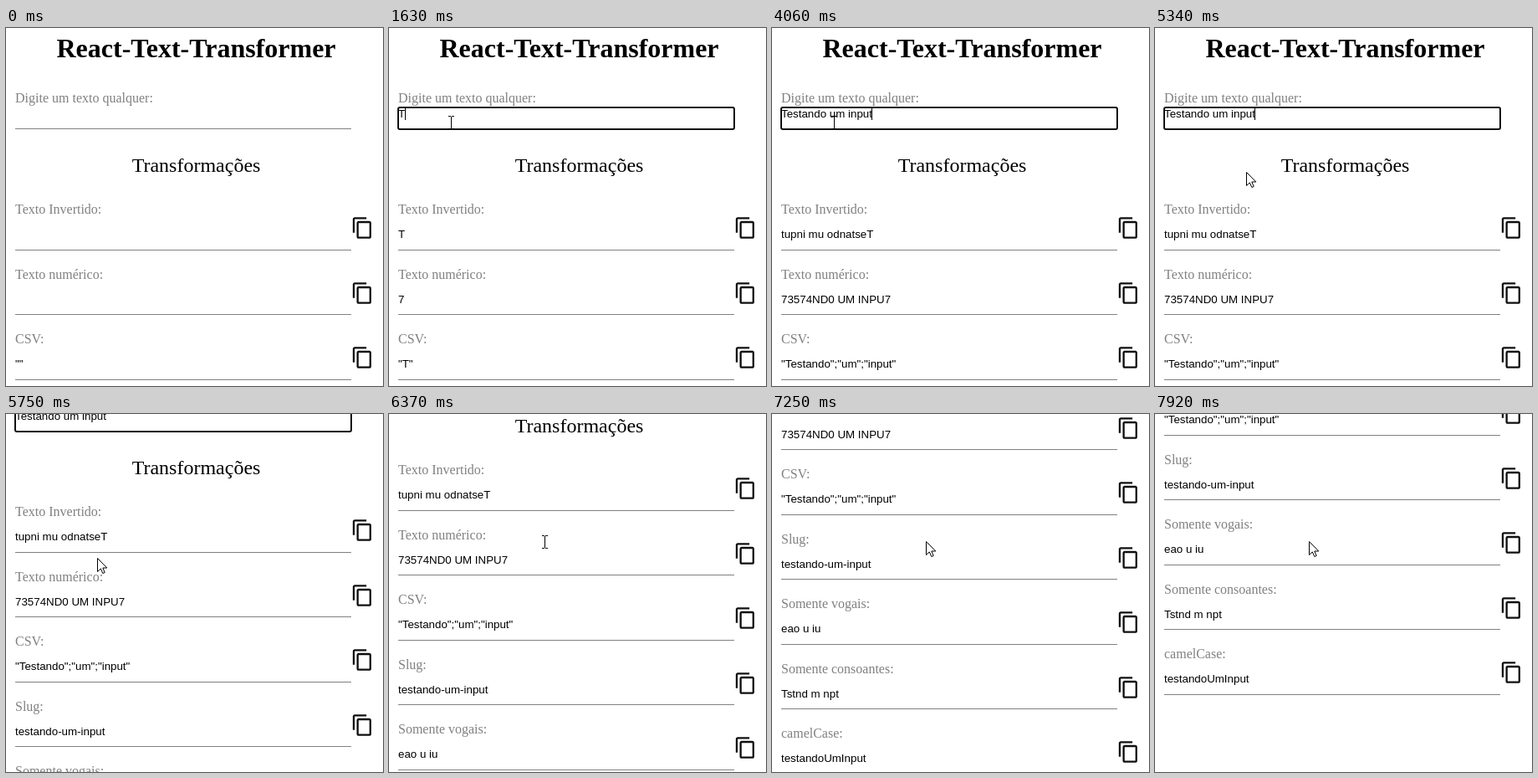
Recreate the animation shown at these times as an HTML page with a canvas. Size 451 by 428 pixels, loop 7990 ms.

```html
<!DOCTYPE html>
<html lang="pt-BR">
<head>
<meta charset="utf-8">
<title>React-Text-Transformer</title>
<style>
  html, body { margin: 0; width: 100%; height: 100%; overflow: hidden; background: #fff; }
  canvas { display: block; }
</style>
</head>
<body>
<canvas id="stage" width="451" height="428"></canvas>
<script>
const ctx = document.getElementById('stage').getContext('2d');
const LOOP = 7990, STEP = 70, W = 451, H = 428;
const LEFT = 11, RIGHT = 413, CENTER = 227.5;
const SERIF = '"Liberation Serif", "Times New Roman", serif';
const SANS = '13.333px "Liberation Sans", Arial, sans-serif';
const GRAY = '#808080', INK = '#101010';

const PHRASE = 'Testando um input';
const FOCUS_AT = 900;
// bursts of typing: first key, last key, number of keys
const BURSTS = [[1630, 1760, 2], [1960, 2680, 7], [3010, 3270, 3], [3470, 3730, 3], [3930, 4060, 2]];
const KEYS = BURSTS.flatMap(([a, b, n]) =>
  Array.from({ length: n }, (_, i) => a + (b - a) * i / (n - 1)));

// first visible step, time already elapsed by then, duration, target
const SCROLLS = [[5540, 30, 200, 100], [6300, 40, 220, 200], [7040, 19, 220, 300], [7780, 40, 180, 395]];
const MOVES = [[70, 0, 490, 72, 112], [4920, 70, 490, 109, 172], [5810, 0, 490, 184, 152]];

const LEET = { T: 7, E: 3, S: 5, A: 4, O: 0 };
const words = s => s.trim().toLowerCase().split(' ');
const ROWS = [
  ['Texto Invertido:', s => [...s].reverse().join('')],
  ['Texto numérico:', s => s.toUpperCase().replace(/[TESAO]/g, c => LEET[c])],
  ['CSV:', s => s.split(' ').map(w => `"${w}"`).join(';')],
  ['Slug:', s => words(s).join('-')],
  ['Somente vogais:', s => s.replace(/[^aeiou ]/gi, '')],
  ['Somente consoantes:', s => s.replace(/[aeiou]/gi, '')],
  ['camelCase:', s => words(s).map((w, i) => i ? w.charAt(0).toUpperCase() + w.slice(1) : w).join('')]
];
const rowY = (base, i) => Math.floor(base + 77.5 * i);

const COPY = new Path2D('M16 1H4c-1.1 0-2 .9-2 2v14h2V3h12V1zm3 4H8c-1.1 0-2 .9-2 2v14c0 1.1.9 2 2 2h11c1.1 0 2-.9 2-2V7c0-1.1-.9-2-2-2zm0 16H8V7h11v14z');
const ARROW = new Path2D('M.5.5V16.5L4.3 12.9 6.8 18.5 9.2 17.5 6.8 12H11.8Z');

function progress(t, first, lead, dur) {
  if (t < first) return 0;
  const p = Math.min(1, (lead + STEP * Math.floor((t - first) / STEP)) / dur);
  return p * p * (3 - 2 * p);
}

function scrollAt(t) {
  let y = 0;
  for (const [first, lead, dur, to] of SCROLLS) y += (to - y) * progress(t, first, lead, dur);
  return Math.round(y);
}

function mouseAt(t) {
  let x = 292, y = 351;
  for (const [first, lead, dur, tx, ty] of MOVES) {
    const p = progress(t, first, lead, dur);
    x += (tx - x) * p;
    y += (ty - y) * p;
  }
  return [Math.round(x), Math.round(y)];
}

function text(s, x, y, font, color = '#000', align = 'left') {
  ctx.font = font;
  ctx.fillStyle = color;
  ctx.textAlign = align;
  ctx.fillText(s, x, y);
}

function rect(x, y, w, h, color) {
  ctx.fillStyle = color;
  ctx.fillRect(x, y, w, h);
}

function copyIcon(y) {
  ctx.save();
  ctx.translate(412.5, y - 14);
  ctx.scale(28 / 24, 28 / 24);
  ctx.fillStyle = INK;
  ctx.fill(COPY);
  ctx.restore();
}

function drawField(t, value) {
  text('Digite um texto qualquer:', LEFT, 89, '16px ' + SERIF, GRAY);
  rect(LEFT, 120, RIGHT - LEFT, 1, GRAY);
  text(value, LEFT, 107, SANS);
  if (t < FOCUS_AT) return;
  const lastKey = KEYS.filter(k => k <= t).pop() || FOCUS_AT;
  if (value && Math.floor((t - lastKey) / 530) % 2 === 0) {
    rect(Math.floor(LEFT + ctx.measureText(value).width), 96, 1, 14, '#000');
  }
  ctx.strokeStyle = INK;
  ctx.lineWidth = 2;
  ctx.beginPath();
  ctx.roundRect(11, 95, 402, 26, 2);
  ctx.stroke();
}

function drawRow([label, convert], i, value) {
  text(label, LEFT, rowY(222.5, i), '16px ' + SERIF, GRAY);
  text(convert(value), LEFT, rowY(251.5, i), SANS);
  rect(LEFT, rowY(265, i), RIGHT - LEFT, 1, GRAY);
  copyIcon(rowY(239.5, i));
}

function overText(x, y) {
  if (x < LEFT || x > RIGHT) return false;
  if (y > 92 && y < 122) return true;
  return ROWS.some((_, i) => y > rowY(234, i) && y < rowY(265, i));
}

function drawMouse(t) {
  if (t < MOVES[0][0]) return;
  const [x, y] = mouseAt(t);
  // the pointer shape only refreshes once scrolling settles
  if (overText(x, y + scrollAt(t - 240))) {
    rect(x + 2, y - 6, 1, 14, '#000');
    for (const row of [y - 7, y + 8]) {
      rect(x - 1, row, 3, 1, '#000');
      rect(x + 3, row, 3, 1, '#000');
    }
    return;
  }
  ctx.save();
  ctx.translate(x, y);
  ctx.fillStyle = '#fff';
  ctx.strokeStyle = '#000';
  ctx.lineWidth = 1;
  ctx.fill(ARROW);
  ctx.stroke(ARROW);
  ctx.restore();
}

function draw(t) {
  const value = PHRASE.slice(0, KEYS.filter(k => k <= t).length);
  rect(0, 0, W, H, '#fff');
  ctx.save();
  ctx.translate(0, -scrollAt(t));
  text('React-Text-Transformer', CENTER, 35, 'bold 32px ' + SERIF, '#000', 'center');
  drawField(t, value);
  text('Transformações', CENTER, 172, '24px ' + SERIF, '#000', 'center');
  ROWS.forEach((row, i) => drawRow(row, i, value));
  ctx.restore();
  drawMouse(t);
}

const begin = performance.now();
function tick() {
  draw((performance.now() - begin) % LOOP);
  requestAnimationFrame(tick);
}
tick();
</script>
</body>
</html>
```
